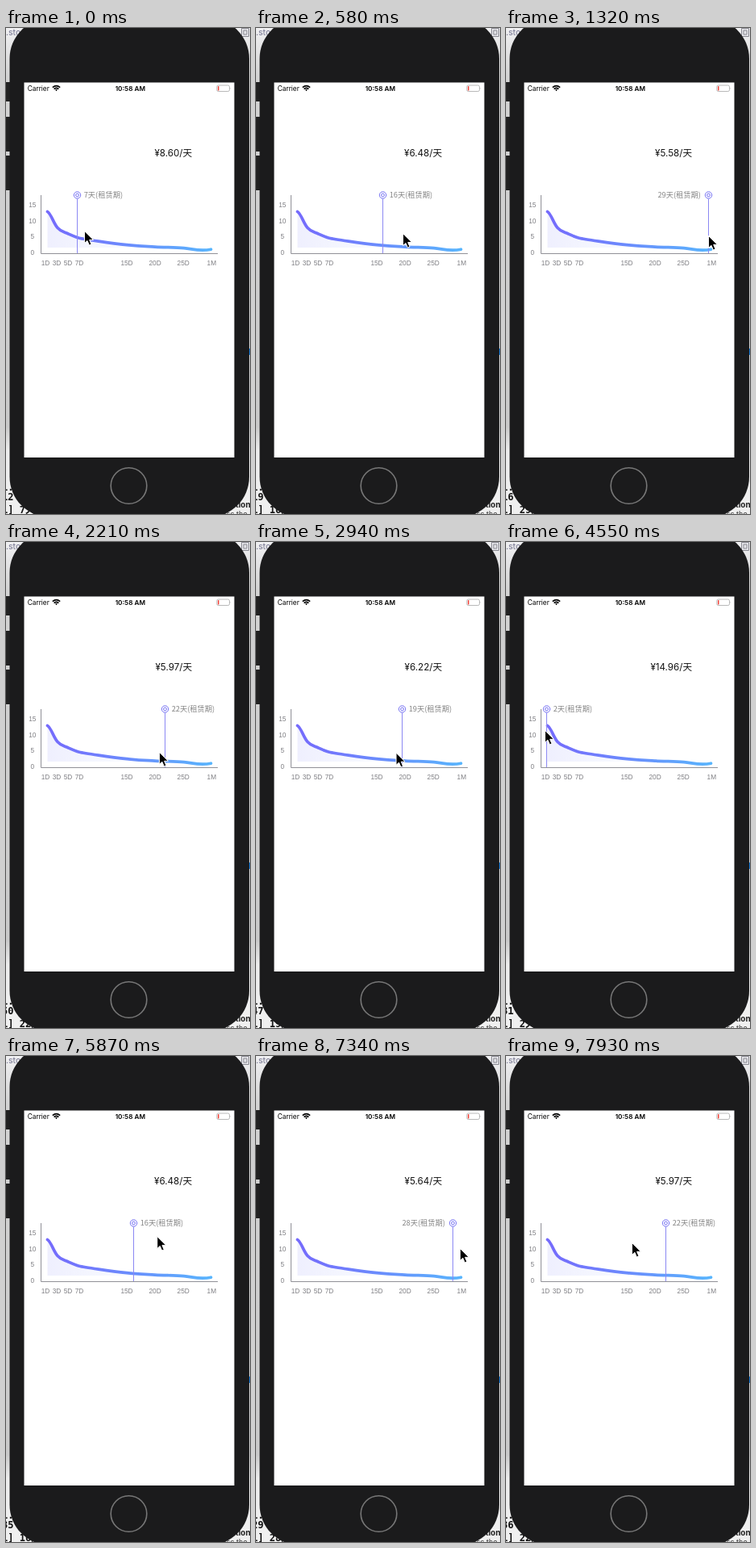
These frames come from a looping animation (303 by 602 pixels, 8000 ms). An HTML page:

```html
<!DOCTYPE html>
<html lang="zh">
<head>
<meta charset="utf-8">
<title>Rental price slider</title>
<style>
html, body { margin: 0; width: 100%; height: 100%; overflow: hidden; background: #ddd; }
svg { display: block; width: 303px; height: 602px; }
text { font-family: Inter, "Noto Sans CJK SC", "Noto Sans CJK", sans-serif; }
.axis text { font-size: 8.3px; fill: #808085; text-anchor: middle; font-family: "Liberation Sans", Arial, sans-serif; }
.label { font: 9.25px "Noto Sans CJK SC", "Noto Sans CJK", sans-serif; fill: #858585; }
.log { font: bold 12px "DejaVu Sans Mono", "Noto Sans CJK SC", "Noto Sans CJK", monospace; fill: #111; white-space: pre; }
</style>
</head>
<body>
<svg viewBox="0 0 303 602">
  <defs>
    <linearGradient id="stroke" gradientUnits="userSpaceOnUse" x1="50" x2="256">
      <stop offset="0" stop-color="#756afc"/>
      <stop offset=".35" stop-color="#6f80fc"/>
      <stop offset="1" stop-color="#58b5fd"/>
    </linearGradient>
    <linearGradient id="area" gradientUnits="userSpaceOnUse" x1="50" x2="190">
      <stop offset="0" stop-color="#7878f5" stop-opacity=".12"/>
      <stop offset="1" stop-color="#78a8ff" stop-opacity=".02"/>
    </linearGradient>
    <linearGradient id="side" x2="0" y2="1">
      <stop offset="0" stop-color="#f0f0f2"/>
      <stop offset=".1" stop-color="#d4d4d4"/>
      <stop offset=".82" stop-color="#cacaca"/>
      <stop offset=".87" stop-color="#ededed"/>
      <stop offset="1" stop-color="#f0f0f0"/>
    </linearGradient>
  </defs>

  <rect width="303" height="602" fill="url(#side)"/>
  <text x="0" y="9" font-size="10.5" fill="#70708c">.stor</text>
  <path d="M292.500 .5h9v10h-9zM295 3h4v5h-4z" fill="#e4e4e8" stroke="#8a8a92"/>
  <path d="M0 67h8v24h-8zM0 110h8v43h-8zM0 158h8v43h-8z" fill="#222"/>
  <rect x="300" y="397" width="3" height="8" fill="#1677d2"/>
  <text x="285" y="594" font-size="10" font-weight="700" fill="#222">tion</text>
  <text x="266" y="605" font-size="9" fill="#333">disc the</text>
  <text class="log" x="-5" y="573">1.</text>
  <text class="log" id="stamp" x="-5" y="585"></text>
  <text class="log" id="log" x="-5" y="601"></text>

  <rect x="4.500" y="-12" width="297.500" height="618" rx="50" fill="#1b1b1c"/>
  <circle cx="152.500" cy="567" r="22.300" fill="none" stroke="#777" stroke-width="1.600"/>
  <rect x="22.500" y="67.500" width="261" height="464.500" fill="#fff"/>

  <text x="26.700" y="77.600" font-size="8.300">Carrier</text>
  <path d="M57.800 73.600q4.700-4 9.400 0M59.600 75.600q2.900-2.500 5.800 0" fill="none" stroke="#000" stroke-width="1.500"/>
  <path d="M61.100 76.600q1.400-1 2.800 0l-1.400 1.600z"/>
  <text x="154.300" y="77.600" font-size="8.200" font-weight="600" text-anchor="middle">10:58 AM</text>
  <rect x="261.800" y="71" width="15.700" height="7.500" rx="1.800" fill="#fff" stroke="#a8a8a8" stroke-width=".8"/>
  <rect x="263" y="72" width="1.500" height="5.500" rx=".6" fill="#f0453c"/>
  <path d="M278.600 73.400q1.200 1.300 0 2.700z" fill="#a8a8a8"/>

  <text id="price" x="231" y="158.800" font-size="11.600" text-anchor="end" fill="#111"></text>

  <g class="axis" id="axis">
    <path d="M43.500 207V279.500H263" fill="none" stroke="#919197"/>
  </g>
  <path id="fill" fill="url(#area)"/>
  <path id="curve" fill="none" stroke="url(#stroke)" stroke-width="3.700" stroke-linecap="round"/>

  <g id="slider" fill="none" stroke="#7470f3">
    <path d="M0 211.500V279" stroke="#8b88f3"/>
    <circle cy="207" r="4.200" fill="#fff"/>
    <circle cy="207" r="1.900"/>
  </g>
  <text class="label" id="label" y="210.200"></text>
  <path id="cursor" d="M0 0V15L3.500 11.900L5.900 17.500L8.500 16.400L6.200 10.900H11Z" stroke="#fff" stroke-linejoin="round"/>
</svg>

<script>
const LOOP = 8000, STEP = 146.8;
const $ = id => document.getElementById(id);

// turning points of the drag: step, x, speed, y
const drag = [
  [-1, 88, 5, 251], [8.5, 252, 0, 257], [15, 190, -4, 260], [19.5, 178, -8, 261],
  [31, 48, 0, 233], [39.5, 173, 31, 223], [50, 253, 11, 238], [54, 156, -44, 231]
];
// day, price
const prices = [[2, 14.96], [7, 8.6], [15, 6.565], [22, 5.97], [29, 5.58]];

const mix = (a, b, u) => a + (b - a) * u;

function span(keys, at) {
  const i = Math.max(1, keys.findIndex(key => key[0] >= at));
  const [a, b] = [keys[i - 1], keys[i]];
  return { a, b, u: (at - a[0]) / (b[0] - a[0]) };
}

function pointer(k) {
  const { a, b, u } = span(drag, k);
  const ease = u * u * (3 - 2 * u);
  const pull = u * (1 - u) * (a[2] * (1 - u) - b[2] * u) * (b[0] - a[0]);
  return { x: mix(a[1], b[1], ease) + pull, y: mix(a[3], b[3], ease) };
}

function priceOf(day) {
  const { a, b, u } = span(prices, day);
  return mix(a[1], b[1], u).toFixed(2);
}

function addTick(text, x, y) {
  const el = document.createElementNS($("axis").namespaceURI, "text");
  el.textContent = text;
  el.setAttribute("x", x);
  el.setAttribute("y", y);
  $("axis").append(el);
}

function buildChart() {
  for (let i = 0; i < 4; i++) addTick(15 - 5 * i, 32.8, 222 + i * 19.7);
  for (let i = 0; i < 4; i++) {
    addTick(2 * i + 1 + "D", 49 + 14 * i, 293.5);
    addTick(["15D", "20D", "25D", "1M"][i], 150 + 35.1 * i, 293.5);
  }
  const line = "M51.500 227.500C56 230 59 242 64 247.500S72 252.500 77 254.800" +
    "S86 259 91 260.200S130 266.500 150 268.600S173 270.400 185 271.100" +
    "S210 271.700 221 272.600S240 277 254.500 274.200";
  $("curve").setAttribute("d", line);
  $("fill").setAttribute("d", line + "V272H51.500Z");
}

function render(t) {
  const k = Math.min(54, Math.floor((t + 10) / STEP));
  const tip = pointer(k);
  // the slider follows one step behind the pointer
  const x = Math.round(Math.min(252, Math.max(50, pointer(k - 1).x)) - 0.2);
  const day = Math.round(2 + (x - 50) / 7.5);
  const flip = x > 212;

  $("slider").setAttribute("transform", `translate(${x + 0.5} 0)`);
  $("label").setAttribute("x", x + (flip ? -9 : 8.7));
  $("label").setAttribute("text-anchor", flip ? "end" : "start");
  $("label").textContent = day + "天(租赁期)";
  $("price").textContent = `¥${priceOf(day)}/天`;
  $("cursor").setAttribute("transform", `translate(${tip.x + 0.4} ${tip.y + 0.4})`);
  $("stamp").textContent = 12 + (k * 37) % 47;
  $("log").textContent = `1] ${day}天`;
}

buildChart();
const start = performance.now();
(function tick() {
  render((performance.now() - start) % LOOP);
  requestAnimationFrame(tick);
})();
</script>
</body>
</html>
```
